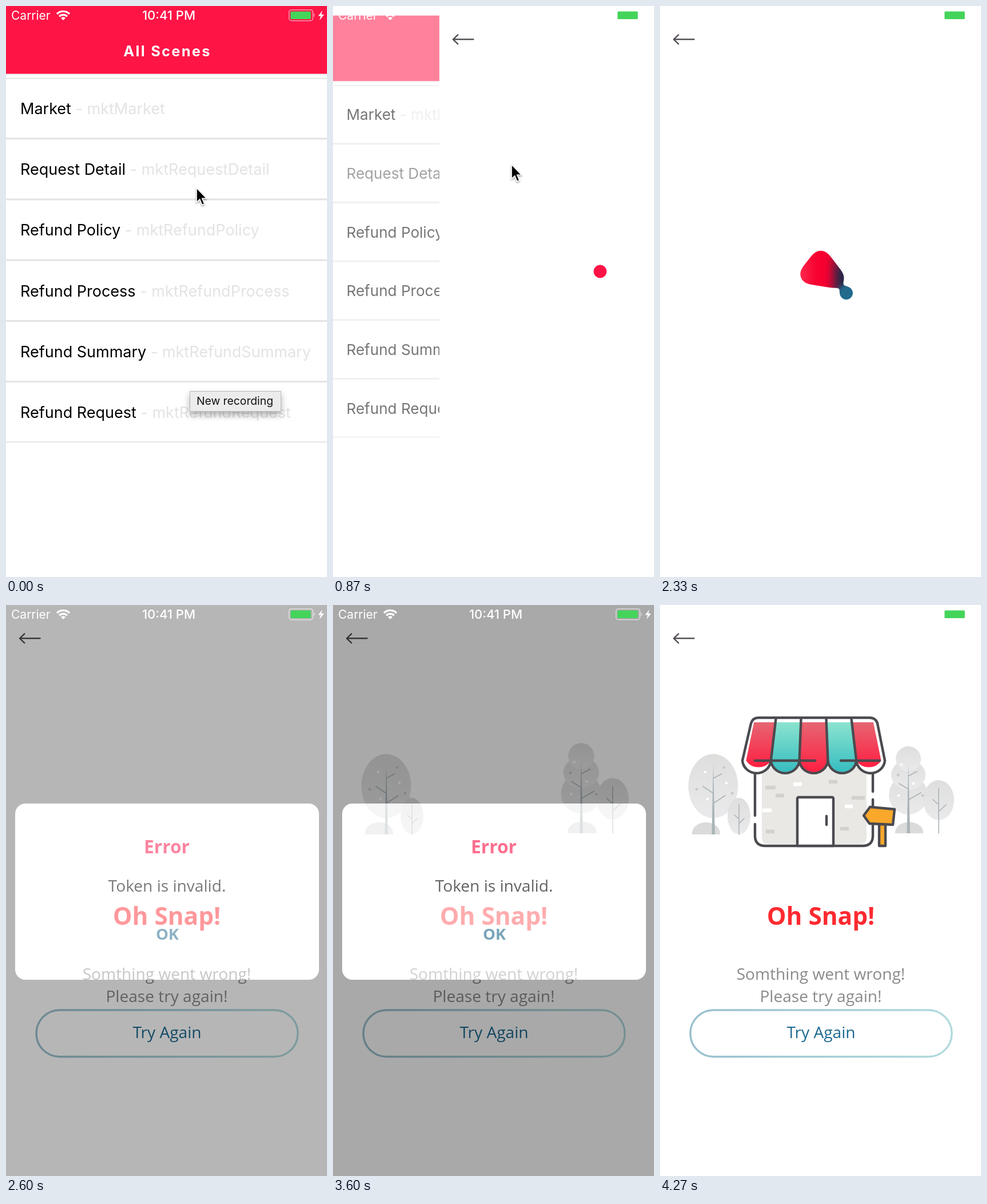
Animation, 561 px wide and 998 px high, one loop 4.34 s. Source, as an HTML page:

```html
<!DOCTYPE html>
<html lang="en">
<head>
<meta charset="utf-8">
<title>Scene list and error dialog</title>
<style>
html,body{margin:0;width:100%;height:100%;overflow:hidden;background:#fff}
svg{display:block;width:100%;height:100%}
.ui{font-family:Inter,Roboto,sans-serif}
.body{font-family:"Open Sans","Noto Sans",sans-serif;font-size:28.1px;text-anchor:middle}
.bold{font-weight:700}
.ink{stroke:#4b4a4f;stroke-width:4.4;stroke-linecap:round;stroke-linejoin:round}
.line{fill:none}
.twig{fill:none;stroke:#aab4b8;stroke-width:1.6;stroke-linecap:round}
.dots{fill:none;stroke-width:4.6;stroke-linecap:round}
.brick{fill:none;stroke-width:6.5}
</style>
</head>
<body>
<svg viewBox="0 0 561 998" preserveAspectRatio="none">
<defs>
  <filter id="goo" filterUnits="userSpaceOnUse" x="150" y="350" width="260" height="260" color-interpolation-filters="sRGB">
    <feGaussianBlur stdDeviation="5.5"/>
    <feColorMatrix values="1 0 0 0 0  0 1 0 0 0  0 0 1 0 0  0 0 0 16 -7.3"/>
  </filter>
  <filter id="soft" x="-30%" y="-60%" width="160%" height="260%"><feDropShadow dx="0" dy="6" stdDeviation="6" flood-opacity=".3"/></filter>
  <filter id="near" x="-50%" y="-50%" width="200%" height="200%"><feDropShadow dx="0" dy="2" stdDeviation="1.5" flood-opacity=".4"/></filter>
  <linearGradient id="red" x2="0" y2="1"><stop stop-color="#e56672"/><stop offset="1" stop-color="#ff1f42"/></linearGradient>
  <linearGradient id="teal" x2="0" y2="1"><stop stop-color="#8be4cf"/><stop offset="1" stop-color="#36bcc0"/></linearGradient>
  <linearGradient id="leaf" x2="0" y2="1"><stop stop-color="#dfdedd"/><stop offset="1" stop-color="#eaeaec"/></linearGradient>
  <linearGradient id="edge"><stop stop-color="#98bfce"/><stop offset="1" stop-color="#b1dade"/></linearGradient>
  <linearGradient id="heat" gradientUnits="userSpaceOnUse" x1="240" x2="322"><stop stop-color="#ff3454"/><stop offset=".4" stop-color="#f70030"/><stop offset=".65" stop-color="#f70030"/><stop id="tail" offset=".9"/></linearGradient>
</defs>
<rect width="561" height="998" fill="#fff"/>

<g id="list" class="ui">
  <rect y="118" width="561" height="3" fill="#000" opacity=".05"/>
  <rect width="561" height="118.5" fill="#ff1446"/>
  <text class="bold" x="282" y="88" font-size="25.4" letter-spacing="2.3" text-anchor="middle" fill="#fff">All Scenes</text>
  <path d="M0 126.5H561M0 762H561" stroke="#dedede" stroke-width="1.6"/>
  <g id="rows" font-size="27"></g>
</g>

<g id="card">
  <rect width="561" height="998" fill="#fff"/>
  <path d="M59.5 58.3H24.5M32.3 50.3L24 58.3L32.3 66.3" fill="none" stroke="#555057" stroke-width="2.4" stroke-linecap="round" stroke-linejoin="round"/>
  <g id="loader" filter="url(#goo)">
    <circle id="drop" r="12.4"/>
    <path id="blob" fill="url(#heat)" stroke="url(#heat)" stroke-linejoin="round" stroke-linecap="round"/>
  </g>
  <g id="error">
    <g id="leftTrees">
      <path d="M56 401C55 373 106 373 105 401Z" fill="#dbdbdb"/>
      <ellipse cx="93" cy="316.5" rx="43.5" ry="56" fill="url(#leaf)"/>
      <path d="M93 277L96 401H90.5Z" fill="#aab4b8"/>
      <path class="twig" d="M93 303L108 295M93 329L75 317M94 346L114 333"/>
      <path class="dots" stroke="#fff" d="M79 292h.1M116 311h.1M83 339h.1"/>
      <path class="dots" stroke="#c4c7c9" d="M112 284h.1M64 322h.1M126 329h.1"/>
      <ellipse cx="138" cy="369" rx="20" ry="32" fill="url(#leaf)"/>
      <path class="twig" d="M138 349V401M138 374L130 367M138 382L147 373"/>
    </g>
    <g id="rightTrees">
      <path d="M411 399C410 373 461 373 460 399Z" fill="#dbdbdb"/>
      <g fill="url(#leaf)"><circle cx="434" cy="332" r="34"/><ellipse cx="434" cy="297" rx="30" ry="26"/><circle cx="434" cy="269" r="22"/><ellipse cx="487" cy="341" rx="27" ry="35"/></g>
      <path d="M434 276L437 399H431.5Z" fill="#aab4b8"/>
      <path class="twig" d="M434 299L449 291M434 322L418 312M435 340L456 328M487 320V399M487 349L477 340M487 361L500 349"/>
      <path class="dots" stroke="#fff" d="M422 279h.1M443 312h.1M417 333h.1"/>
      <path class="dots" stroke="#c4c7c9" d="M416 297h.1M459 333h.1"/>
    </g>
    <g id="house">
      <g id="walls">
        <path d="M178 285H361V406Q361 418 349 418H190Q178 418 178 406Z" fill="#e9e8e4"/>
        <path class="brick" stroke="#d2d1cd" d="M184 319h18M202 333h15M295 309h15M335 337h23M315 391h15M185 396h15"/>
        <path class="brick" stroke="#fff" d="M233 313h15M323 352h14M179 359h16"/>
        <path class="ink line" d="M166 293V368M166 383V403Q166 421 184 421H354Q372 421 372 403V340M372 293V326"/>
        <path class="ink" d="M240 421V339Q240 336 243 336H300Q303 336 303 339V421Z" fill="#fff"/>
        <path id="handle" class="ink" d="M291 369V384"/>
      </g>
      <g id="roof">
        <path id="eaves" d="M172 197H366Q377 197 380 207L393 272a25 24 0 0 1 -49.8 0a25 24 0 0 1 -49.8 0a25 24 0 0 1 -49.8 0a25 24 0 0 1 -49.8 0a25 24 0 0 1 -49.8 0L159 207Q162 197 172 197Z" fill="#fff"/>
        <g id="stripes"></g>
        <use href="#eaves" class="ink" style="fill-opacity:0"/>
        <path class="ink line" d="M166 272H271M316 272H384"/>
      </g>
    </g>
    <g id="sign" class="ink" fill="#f9a82b">
      <path d="M383 383H394V421H383Z"/>
      <path d="M356 368L367 353L410 357L407 384L366 382Z"/>
    </g>
    <g class="body">
      <text class="bold" x="281" y="559" style="font-size:42.4px" fill="#ff2a30">Oh Snap!</text>
      <g fill="#8a8a8a"><text x="281" y="655">Somthing went wrong!</text><text x="281" y="694">Please try again!</text></g>
      <rect x="53" y="708" width="457" height="81.5" rx="40.7" fill="none" stroke="url(#edge)" stroke-width="3.4"/>
      <text x="281.5" y="757" fill="#1d6a90">Try Again</text>
    </g>
  </g>
</g>

<g id="alert" class="body">
  <rect width="561" height="998" opacity=".55"/>
  <rect x="16" y="347" width="531" height="308" rx="18" fill="#fff"/>
  <text class="bold" x="281" y="434" style="font-size:31.7px" fill="#fb1549">Error</text>
  <text x="281.5" y="501">Token is invalid.</text>
  <text class="bold" x="282" y="585" style="font-size:27.5px" fill="#226b8f">OK</text>
</g>

<g class="ui" fill="#fff" font-size="21">
  <text x="9" y="24">Carrier</text>
  <text x="284.5" y="24" text-anchor="middle" font-size="22" font-weight="500">10:41 PM</text>
  <path d="M100 25L96 21A5.6 5.6 0 0 1 104 21Z"/>
  <path d="M93.2 18.2A9.6 9.6 0 0 1 106.8 18.2M89 14A15.5 15.5 0 0 1 111 14" fill="none" stroke="#fff" stroke-width="3.4"/>
  <rect x="494.7" y="6.7" width="41.6" height="19" rx="4" fill="none" stroke="#fff" stroke-opacity=".55" stroke-width="1.6"/>
  <path d="M538 12.5Q541 16 538 20Z" opacity=".6"/>
  <rect x="497.3" y="9.5" width="35.4" height="13.6" rx="1.6" fill="#44d45a"/>
  <path d="M553 8L545.5 17.5H550L548 25L556 14.7H551Z"/>
</g>

<g id="tooltip" class="ui">
  <rect x="321.5" y="673.5" width="159" height="35" fill="#ececec" stroke="#b9b9b9" filter="url(#soft)"/>
  <text x="333" y="697" font-size="19.3" fill="#111">New recording</text>
</g>
<path id="cursor" d="M0 0V25L5.6 19.8L9.6 29.5L13.8 27.7L9.8 18.2H17.5Z" stroke="#fff" stroke-width="1.6" filter="url(#near)"/>
</svg>
<script>
const $ = id => document.getElementById(id);
const NS = 'http://www.w3.org/2000/svg';
const LOOP = 4340, STEP = 200 / 3, LAST = 64;

function add(parent, tag, attrs, text = '') {
  const el = parent.appendChild(document.createElementNS(NS, tag));
  set(el, attrs);
  el.textContent = text;
  return el;
}
function set(el, attrs) {
  for (const key in attrs) el.setAttribute(key, attrs[key]);
}
const clamp = (x, lo = 0, hi = 1) => Math.min(hi, Math.max(lo, x));
const ramp = (t, from, to) => clamp((t - from) / (to - from));
const mix = (a, b, u) => a + (b - a) * u;
const blend = (a, b, u) => `rgb(${a.map((v, i) => Math.round(mix(v, b[i], u)))})`;
const backOut = u => 1 + 2.7 * (u - 1) ** 3 + 1.7 * (u - 1) ** 2;
const scaleAt = (x, y, sx, sy = sx) => `translate(${x} ${y}) scale(${sx} ${sy}) translate(${-x} ${-y})`;
const polar = (degrees, r) => {
  const a = degrees * Math.PI / 180;
  return [281 + r * Math.cos(a), 464 + r * Math.sin(a)];
};

const rows = ['Market', 'Request Detail', 'Refund Policy', 'Refund Process', 'Refund Summary', 'Refund Request'].map((name, i) => {
  const y = i * 106.2;
  if (i) add($('rows'), 'rect', { y: 124 + y, width: 561, height: 3.2, fill: '#e4e4e4' });
  const row = add($('rows'), 'text', { x: 25, y: 189 + y }, name);
  add(row, 'tspan', { fill: '#e3e3e3' }, ' - mkt' + name.replace(' ', ''));
  return row;
});

// Awning stripes fan out from the middle; the outer two leave a white rim.
for (let i = 0; i < 5; i++) {
  const [a, b] = [i - 2.5, i - 1.5].map(d => clamp(d, -2.37, 2.37));
  const top = d => 268.5 + 44 * d, low = d => 268.5 + 49.8 * d;
  add($('stripes'), 'path', {
    d: `M${top(a)} 205H${top(b)}L${low(b)} 272A25 23 0 0 1 ${low(a)} 272Z`,
    fill: `url(#${i % 2 ? 'teal' : 'red'})`
  });
  if (i) add($('stripes'), 'path', { class: 'ink', d: `M${top(a)} 199L${low(a)} 272` });
}

function drawLoader(t) {
  const swing = t < 1195 ? 0 : Math.sin(Math.PI * (t - 1195) / 877) ** 2;
  const cool = ramp(t, 1700, 2200);
  const [cx, cy] = polar(62 * swing, 90 * swing);
  set($('drop'), { cx, cy, fill: blend([255, 18, 70], [34, 107, 143], cool) });
  const reach = 46 * swing ** 2;
  const corners = [polar(-90, reach), polar(166, reach), polar(26, 1.35 * reach)];
  set($('blob'), {
    d: `M${corners.join('L')}Z`,
    'stroke-width': 24 + 14 * Math.sin(Math.PI * swing) ** 2
  });
  $('blob').style.display = swing ? '' : 'none';
  set($('tail'), { 'stop-color': blend([247, 0, 48], [36, 40, 72], cool) });
}

function drawError(t) {
  const pop = (id, x, y, start) => set($(id), { transform: scaleAt(x, y, backOut(ramp(t, start, start + 400))) });
  pop('leftTrees', 93, 401, 3127);
  pop('rightTrees', 440, 399, 3270);
  pop('sign', 388, 421, 3830);

  const squash = 1 - backOut(ramp(t, 3640, 4250));
  set($('walls'), { transform: scaleAt(268.5, 422, 1 + .083 * squash, 1 - squash) });
  set($('roof'), { transform: `translate(0 ${125 * squash}) ${scaleAt(268.5, 297, 1 + .17 * squash, 1 - .8 * squash)}` });
  set($('house'), { opacity: ramp(t, 3640, 3810) });
  set($('handle'), { opacity: ramp(t, 3800, 3950) });
}

function draw(t) {
  const slide = 1 - (1 - ramp(t, 746, 1246)) ** 4;
  set($('list'), {
    transform: `translate(${-15 * slide} 0) ${scaleAt(280.5, 499, 1 - .05 * slide)}`,
    opacity: 1 - .7 * slide
  });
  set(rows[1], { opacity: 1 - .75 * (ramp(t, 560, 680) - ramp(t, 740, 960)) });
  set($('card'), { transform: `translate(${561 * (1 - slide)} 0)` });

  const failed = t > 2440;
  $('loader').style.display = failed ? 'none' : '';
  $('error').style.display = failed ? '' : 'none';
  if (failed) drawError(t); else drawLoader(t);

  set($('alert'), { opacity: ramp(t, 2450, 2740) - ramp(t, 3480, 3790) });
  set($('tooltip'), { opacity: 1 - ramp(t, 60, 300) });

  const toRow = ramp(t, 60, 500), toButton = ramp(t, 2740, 3100);
  const [x, y] = t < 2000
    ? [mix(333, 312, toRow), mix(318, 277, toRow)]
    : [mix(332, 317, toButton), mix(545, 580, toButton)];
  set($('cursor'), { transform: `translate(${x} ${y})` });
  $('cursor').style.display = t < 1130 || (t > 2740 && t < 3480) ? '' : 'none';
}

const origin = performance.now();
function tick() {
  const t = (performance.now() - origin) % LOOP;
  draw(Math.min(LAST, Math.floor((t + 4) / STEP)) * STEP);
  requestAnimationFrame(tick);
}
tick();
</script>
</body>
</html>
```
